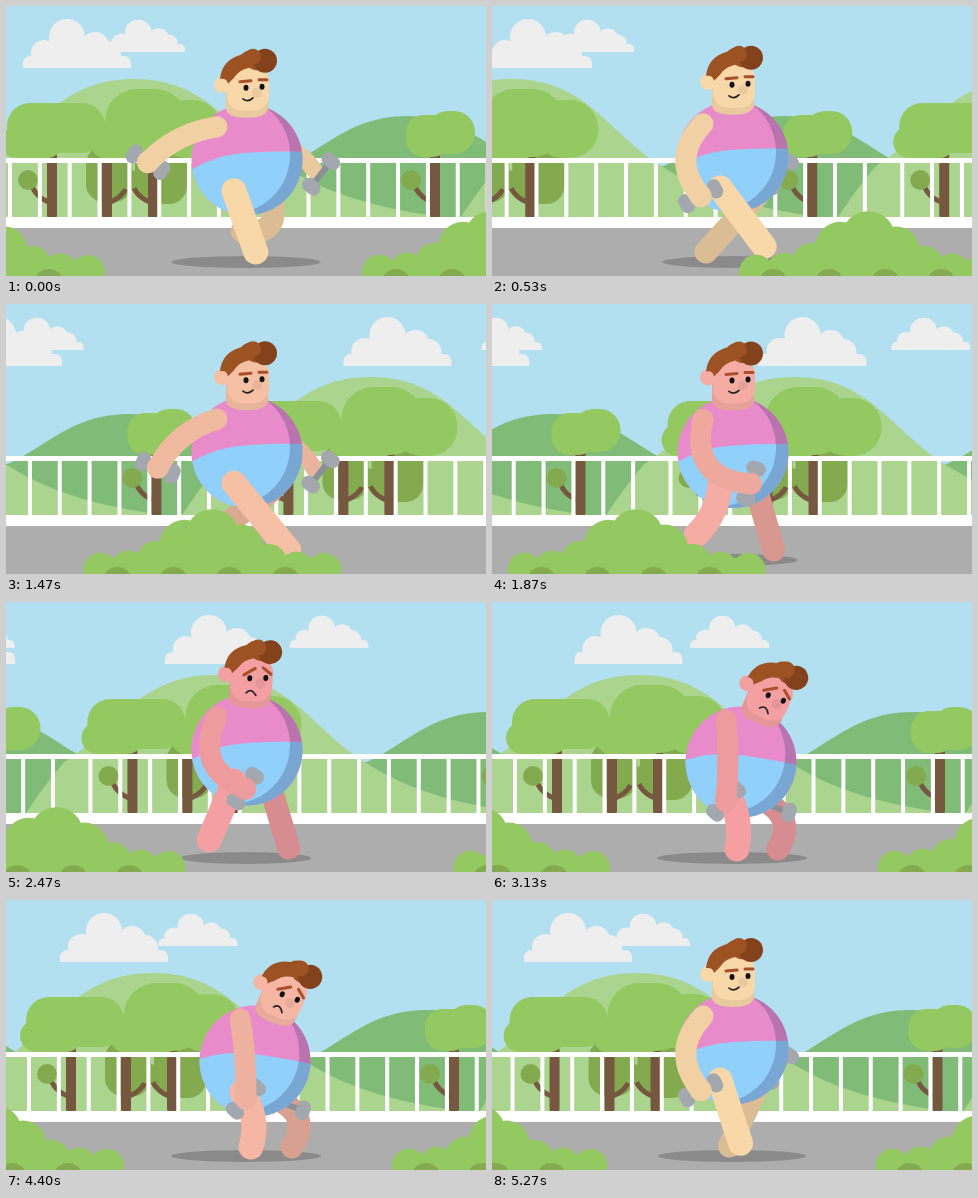
Animation of 480 by 270 pixels, one loop 5.34 s. Source, as an HTML page with a canvas:

```html
<!DOCTYPE html>
<html lang="en">
<head>
<meta charset="utf-8">
<style>
html, body { margin: 0; height: 100%; overflow: hidden; }
canvas { display: block; width: 100vw; height: 100vh; }
</style>
</head>
<body>
<canvas id="stage" width="480" height="270"></canvas>
<script>
const c = document.getElementById('stage').getContext('2d');
const LOOP = 5340, STEP = 200 / 3, TILE = 515;
const LEAF = '#94c860', LEAF_DARK = '#84aa50', BARK = '#75583f';

// ms, scenery offset, step phase
const WALK = [
  [0, 496, 1.4], [1070, 283, 9.7], [1870, 155, 16], [2470, 61, 21.9],
  [3130, 0, 28], [LOOP, 0, 50]
];

const { sin, cos, PI } = Math;
const lerp = (a, b, u) => a + (b - a) * u;
const mix = (a, b, u) => a.map((v, i) => lerp(v, b[i], u));
function smooth(a, b, t) {
  const u = Math.min(1, Math.max(0, (t - a) / (b - a)));
  return u * u * (3 - 2 * u);
}
// Cubic curve through the keys that stays flat where a neighbouring part is flat
function spline(keys, col, t) {
  const last = keys.length - 2;
  const secant = i => (keys[i + 1][col] - keys[i][col]) / (keys[i + 1][0] - keys[i][0]);
  const slope = i => {
    const a = secant(Math.max(i - 1, 0)), b = secant(Math.min(i, last));
    return a * b > 0 ? (a + b) / 2 : 0;
  };
  let i = 0;
  while (i < last && t >= keys[i + 1][0]) i++;
  const d = keys[i + 1][0] - keys[i][0], u = (t - keys[i][0]) / d;
  return lerp(keys[i][col], keys[i + 1][col], u * u * (3 - 2 * u)) +
    d * u * (1 - u) * (slope(i) * (1 - u) - slope(i + 1) * u);
}

function at(x, y, draw, angle = 0, sx = 1, sy = sx) {
  c.save();
  c.translate(x, y);
  c.rotate(angle * PI / 180);
  c.scale(sx, sy);
  draw();
  c.restore();
}
function oval(x, y, rx, ry = rx) {
  c.beginPath();
  c.ellipse(x, y, rx, ry, 0, 0, 7);
  c.fill();
}
function pill(x, y, w, h, r) {
  c.beginPath();
  c.roundRect(x, y, w, h, r);
  c.fill();
}
function stroke(d, color, width) {
  c.strokeStyle = color;
  c.lineWidth = width;
  c.lineCap = 'round';
  c.stroke(new Path2D(d));
}
function fill(d, color) {
  c.fillStyle = color;
  c.fill(new Path2D(d));
}
function tiled(scroll, draw) {
  for (let i = -2; i < 2; i++) at(scroll + i * TILE, 0, draw);
}

function cloud(x, bottom, sx = 1, sy = sx) {
  at(x, bottom, () => {
    c.fillStyle = '#eeeeef';
    pill(0, -12, 108, 12, [7, 7, 0, 0]);
    pill(22, -28, 64, 28, 10);
    oval(21, -15, 13);
    oval(44, -31, 18);
    oval(72, -22, 14);
    oval(85, -14, 13);
  }, 0, sx, sy);
}

const darkHill = () =>
  fill('M275 168C329 157 353 110 420 110S511 157 565 168Z', '#80bb77');
const lightHill = () => at(147, 0, () =>
  fill('M0 73C75 73 95 125 150 160S260 205 330 214H-190S-172 185 -150 160C-95 125 -75 73 0 73Z', '#abd58f'));

function trunk(x, side) {
  stroke(`M${x} 150V209`, BARK, 10);
  stroke(`M${x} 197Q${x + side * 18} 192 ${x + side * 22} 174`, BARK, 5);
  c.fillStyle = LEAF_DARK;
  oval(x + side * 24, 174, 10);
}
function trees() {
  c.fillStyle = LEAF_DARK;
  pill(99, 140, 46, 56, 18);
  pill(148, 140, 52, 58, 18);
  trunk(65, -1);
  trunk(120, 1);
  trunk(166, -1);
  trunk(448, -1);
  c.fillStyle = LEAF;
  pill(20, 97, 98, 50, 23);
  pill(14, 120, 62, 32, 16);
  pill(104, 118, 70, 35, 16);
  pill(118, 83, 82, 68, 32);
  pill(170, 94, 64, 58, 28);
  pill(440, 105, 48, 43, 21);
  pill(419, 109, 44, 42, 18);
}
function fence() {
  c.fillStyle = '#fff';
  for (let i = 0; i < 17; i++) c.fillRect(21 + i * 29.85, 155, 4, 57);
  c.fillRect(0, 152, TILE + 1, 5);
  c.fillRect(0, 211, TILE + 1, 11);
}
function bush(left) {
  at(left, 270, () => {
    c.fillStyle = LEAF;
    c.fillRect(20, -16, 210, 16);
    for (let x = 15; x < 245; x += 28) {
      const swell = Math.exp(-(((x - 124) / 47) ** 2));
      oval(x, -4 - 34 * swell, 17 + 10 * swell);
    }
    c.fillStyle = LEAF_DARK;
    for (let x = 32; x < 230; x += 56) oval(x, 3, 13, 10);
  });
}

function limb(ax, ay, bx, by, bend, width, color) {
  const dx = bx - ax, dy = by - ay, k = 1.7 * bend / (Math.hypot(dx, dy) || 1);
  stroke(`M${ax} ${ay}Q${(ax + bx) / 2 - dy * k} ${(ay + by) / 2 + dx * k} ${bx} ${by}`, color, width);
}
function leg(hx, hy, fx, fy, width, color) {
  const half = Math.hypot(fx - hx, fy - hy) / 2;
  limb(hx, hy, fx, fy, -Math.sqrt(Math.max(0, 29 * 29 - half * half)), width, color);
}
function dumbbell(x, y, angle) {
  at(x, y, () => {
    stroke('M-14 0H14', '#8b8f97', 6);
    c.fillStyle = '#a3a7ae';
    pill(-23, -10, 14, 20, 7);
    pill(9, -10, 14, 20, 7);
  }, angle);
}
function belly() {
  c.beginPath();
  c.arc(0, 0, 55.5, 0, 7);
  c.clip();
  c.fillStyle = '#e88bca';
  c.fillRect(-60, -60, 120, 120);
  fill('M-60 12Q-30 -6 0 -7Q30 -9 60 -8V60H-60Z', '#91d0fb');
  c.fillStyle = 'rgba(50,50,100,.26)';
  c.beginPath();
  c.arc(0, 0, 60, 0, 7);
  c.moveTo(43, -5);
  c.arc(-16, -5, 59, 0, 7);
  c.fill('evenodd');
}
function head(skin, shade, sad) {
  fill('M-21 -72H21V-52Q20 -42 0 -42Q-21 -42 -21 -52Z', shade);
  c.fillStyle = skin;
  oval(-25, -75, 8);
  pill(-20, -93, 42, 44, 15);
  c.fillStyle = shade;
  oval(10, -67, 5);

  const hair = '#9d5224';
  fill('M-27 -81Q-25 -100 -6 -105Q2 -113 12 -108L18 -90Q8 -88 2 -92Q-8 -90 -13 -82L-19 -76Q-20 -82 -27 -81Z', hair);
  c.fillStyle = '#83421c';
  oval(18, -99, 12);
  c.fillStyle = hair;
  oval(6, -103, 8);

  const tilt = 3 * sad, y = lerp(-61, -57, sad);
  stroke(`M-7 ${tilt - 78}L4 ${-79 - tilt}M12 ${-80 - tilt}L20 ${tilt - 80}`, '#a9502a', 3);
  c.fillStyle = '#111';
  oval(-1, -72, 2.5, 3);
  oval(15, -73, 2.5, 3);
  stroke(`M-4 ${y}Q1 ${lerp(-57, -63, sad)} 6 ${y - 1 + tilt}`, '#222', 1.7);
}

// Feet circle under the hips while arms swing against them; tiredness blends into a slump
function poseAt(t) {
  const phase = spline(WALK, 2, t);
  const stride = 1 - smooth(2600, 3130, t) + .4 * smooth(5070, 5400, t);
  const tired = smooth(2650, 3130, t) * (1 - smooth(4850, 5200, t));
  const breath = (1 - cos((t - 3130) / 850 * 2 * PI)) / 2;
  const swing = .5 - .58 * stride * cos(phase - .9);
  const foot = p => [
    243 + 40 * stride * cos(p),
    246 - 22 * stride * Math.max(0, -sin(p + .5))
  ];
  return {
    tired,
    body: mix([241, 148 + 3 * stride * (1 - cos(2 * phase))], [249, 160 + breath], tired),
    hand: mix([lerp(143, 263, swing), lerp(157, 178, swing) + 22 * sin(PI * swing)],
      [234 + 6 * breath, 199], tired),
    bend: lerp(lerp(8, 28, swing), -2, tired),
    angle: lerp(lerp(210, 105, swing), 133, tired),
    farHand: mix([315 - 90 * swing * swing, 168], [282, 205], tired),
    farAngle: lerp(-52, 20, tired),
    near: mix(foot(phase), [245, 247], tired),
    far: mix(foot(phase + PI), [286, 247], tired),
    shadow: 75 - 5 * stride * (1 + cos(2 * phase))
  };
}

function person(t) {
  const p = poseAt(t), [x, y] = p.body;
  const sad = smooth(2070, 2340, t) * (1 - smooth(4800, 5070, t));
  const flush = smooth(700, 2400, t) * (1 - .4 * smooth(3130, 4400, t)) * (1 - smooth(4700, 5100, t));
  const tone = k => `rgb(${mix([248, 215, 168], [244, 160, 162], flush).map(v => v * k)})`;
  const skin = tone(1), shade = tone(.94), dim = tone(.88);
  const lean = 23 * p.tired, a = lean * PI / 180;

  c.fillStyle = '#8a8a8a';
  oval(240, 256, p.shadow, 6);

  leg(x + 24, y + 39, ...p.far, 23, dim);
  limb(x + 28, y - 15, p.farHand[0] - 7, p.farHand[1] - 4, -6, 17, shade);
  dumbbell(...p.farHand, p.farAngle);
  at(x, y, belly, lean / 2);
  at(x, y, () => head(skin, shade, sad), lean + 3 * sad * (1 - p.tired));
  leg(x - 13, y + 31, ...p.near, 25, skin);

  dumbbell(...p.hand, p.angle);
  limb(x - 30 * cos(a) + 33 * sin(a), y - 33 * cos(a) - 30 * sin(a), ...p.hand, p.bend, 21, tone(.97));
  c.fillStyle = tone(.97);
  oval(...p.hand, 11);
}

function draw(t) {
  const sec = t / 1000;
  const scroll = spline(WALK, 1, t) - 3 * smooth(5070, LOOP, t);
  c.fillStyle = '#b3e0f0';
  c.fillRect(0, 0, 480, 270);
  cloud(100 - 69 * sec, 46, .73, .66);
  cloud(17 - 47 * sec, 62);
  cloud(311 + scroll - 36 * sec, 46, .73, .66);
  cloud(153 + scroll - 22.5 * sec, 62);

  c.fillStyle = '#80bb77';
  c.fillRect(0, 160, 480, 60);
  for (const layer of [darkHill, lightHill, trees]) tiled(scroll, layer);
  c.fillStyle = '#adadad';
  c.fillRect(0, 222, 480, 48);
  tiled(scroll, fence);
  person(t);
  for (const left of [-653, -138, 388]) bush(left + scroll);
}

function tick(now) {
  draw(Math.floor((now % LOOP + 5) / STEP) % 80 * STEP);
  requestAnimationFrame(tick);
}
requestAnimationFrame(tick);
</script>
</body>
</html>
```
